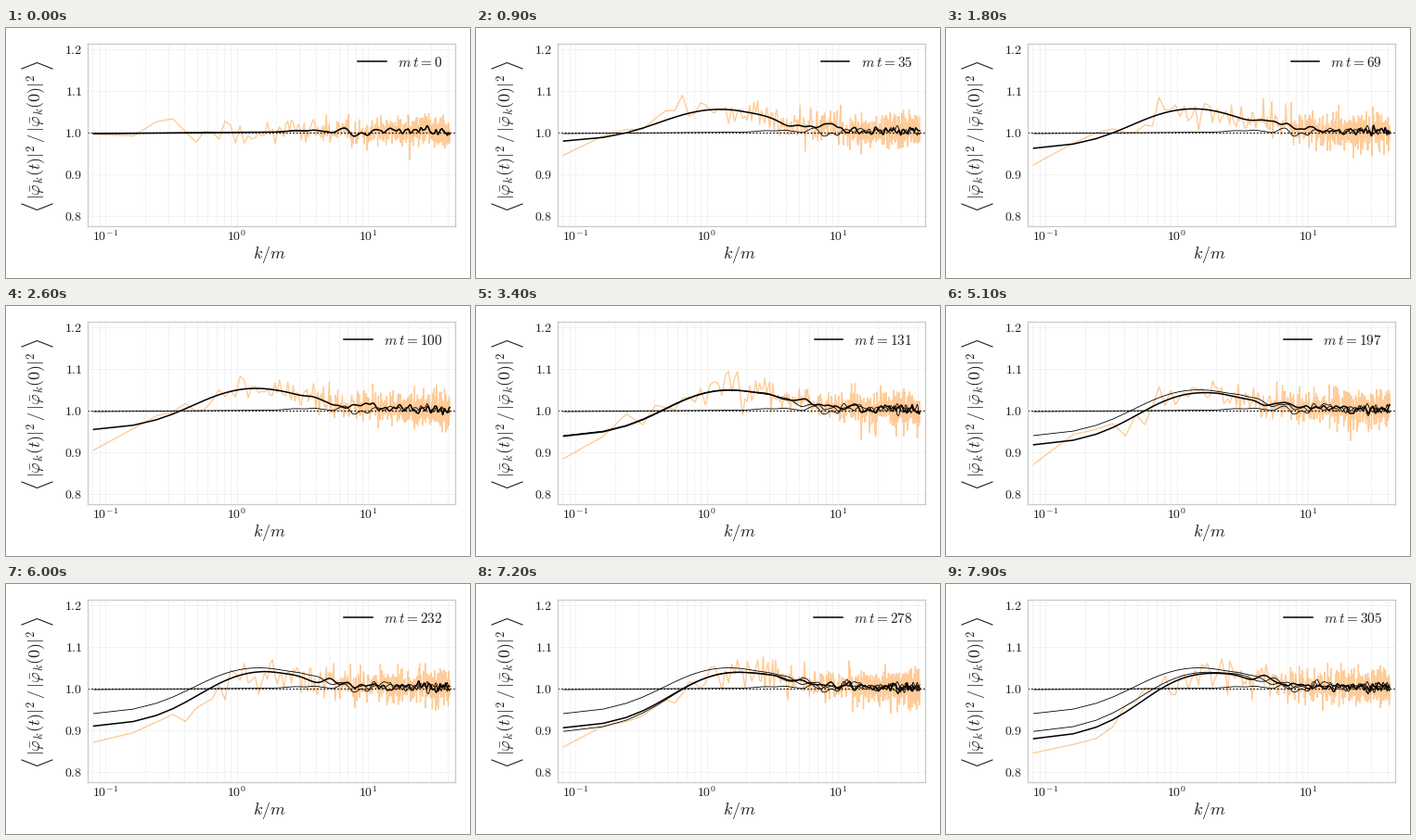
Write a matplotlib script that moves like this. It is 500 px wide and 270 px high and loops after 8000 ms.

```python
import numpy as np
import matplotlib.pyplot as plt
from matplotlib.animation import FuncAnimation
from matplotlib.ticker import FuncFormatter, LogLocator, MultipleLocator, NullFormatter

W, H, DPI = 500, 270, 100
FRAMES, INTERVAL = 80, 100
TIME_STEP = 3.86
SNAPSHOTS = (0, 32, 64)
INK = "0.12"

plt.rcParams.update({
    "mathtext.fontset": "cm",
    "font.family": "DejaVu Serif",
    "text.color": INK,
})

# Modes are evenly spaced in k.
N, K1 = 512, 0.0813
n = np.arange(1, N + 1)
k = K1 * n
edge = np.exp(1.0 - n)  # weight of the very lowest modes


def mean_curve(i):
    """Depleted low modes rising into a hump that decays to 1 at high k."""
    depth = 0.112 * (i / 79) ** 0.75 + 0.0085 * i / 64 * np.cos(np.pi * i / 8)
    hump = (0.065 + 0.04 * np.exp(-i / 25)) * (1 - np.exp(-i / 5))
    turn = 5.5 + 0.018 * i
    rise = n ** 2 / (n ** 2 + turn ** 2)
    decay = 1 / (1 + (n / 35) ** 2)
    drift = 0.0025 * np.log10(n) - 0.003
    return 1 + drift + decay * ((depth + hump) * rise - depth)


def gaussian(values, sigma):
    r = np.arange(-4 * sigma, 4 * sigma + 1)
    kernel = np.exp(-0.5 * (r / sigma) ** 2)
    return np.convolve(values, kernel / kernel.sum(), mode="same")


def spectrum(i):
    """Noisy and smoothed spectrum at step i."""
    rng = np.random.default_rng(1000 + i)
    settled = 1 - np.exp(-i / 5)
    base = mean_curve(i)
    noise = rng.normal(0, 0.018 + 0.0025 * settled, N)
    raw = base + noise * (1 - 0.75 * edge) - 0.045 * settled * edge
    fade = np.clip((n - 20) / 40, 0, 1)
    return raw, base + 1.1 * fade * gaussian(noise, 5)


def time_label(i):
    return rf"$m\:t = {round(i * TIME_STEP)}$"


fig = plt.figure(figsize=(W / DPI, H / DPI), dpi=DPI, facecolor="white")
ax = fig.add_axes([88 / W, 56 / H, 396 / W, 197 / H])
ax.set_xscale("log")
ax.set_xlim(10 ** -1.1356, 10 ** 1.661)
ax.set_ylim(0.775, 1.2125)

ax.xaxis.set_major_locator(LogLocator(10))
ax.xaxis.set_minor_locator(LogLocator(10, subs=range(2, 10)))
ax.xaxis.set_major_formatter(
    FuncFormatter(lambda v, _: rf"$10^{{{round(np.log10(v))}}}$"))
ax.xaxis.set_minor_formatter(NullFormatter())
ax.yaxis.set_major_locator(MultipleLocator(0.1))
ax.yaxis.set_major_formatter(FuncFormatter(lambda v, _: f"${v:.1f}$"))
ax.tick_params(which="both", length=0, labelsize=10, labelcolor=INK)
ax.tick_params(axis="x", pad=2.3)
ax.tick_params(axis="y", pad=4)
ax.grid(True, which="both", color="0.85", lw=0.6, ls=":")
ax.set_axisbelow(True)
for spine in ax.spines.values():
    spine.set(color="0.8", linewidth=1)

# Axis labels, with the tall angle brackets drawn as strokes.
fig.text(284 / W, 1 - 248.5 / H, "$k/m$", size=13, ha="center", va="baseline")
fig.text(38.5 / W, 1 - 117 / H,
         r"$|\bar{\varphi}_k(t)|^2\,/\,|\bar{\varphi}_k(0)|^2$",
         size=13, rotation=90, rotation_mode="anchor",
         ha="center", va="baseline")
for tip, foot in ((196.5, 190), (37.5, 44)):
    fig.add_artist(plt.Line2D(np.array([17, 33.5, 50]) / W,
                              1 - np.array([foot, tip, foot]) / H,
                              color=INK, lw=0.8))

raw_line, = ax.plot([], [], color="#ff8000", alpha=0.4, lw=1, zorder=2)
ax.axhline(1, color="black", lw=1, ls=":", zorder=2.5)
thin_lines = [ax.plot(k, spectrum(s)[1], color="black", lw=0.6, zorder=3)[0]
              for s in SNAPSHOTS]
mean_line, = ax.plot([], [], color="black", lw=1.1, zorder=4)
legend = ax.legend([mean_line], [time_label(0)], loc="upper right",
                   bbox_to_anchor=(1, 1.005), fontsize=11, frameon=False)
label = legend.get_texts()[0]


def update(i):
    raw, mean = spectrum(i)
    raw_line.set_data(k, raw)
    mean_line.set_data(k, mean)
    for start, line in zip(SNAPSHOTS, thin_lines):
        line.set_visible(i >= start)
    label.set_text(time_label(i))
    return [raw_line, mean_line, *thin_lines, label]


anim = FuncAnimation(fig, update, frames=FRAMES, interval=INTERVAL,
                     repeat=True, repeat_delay=0, blit=False)
plt.show()
```
